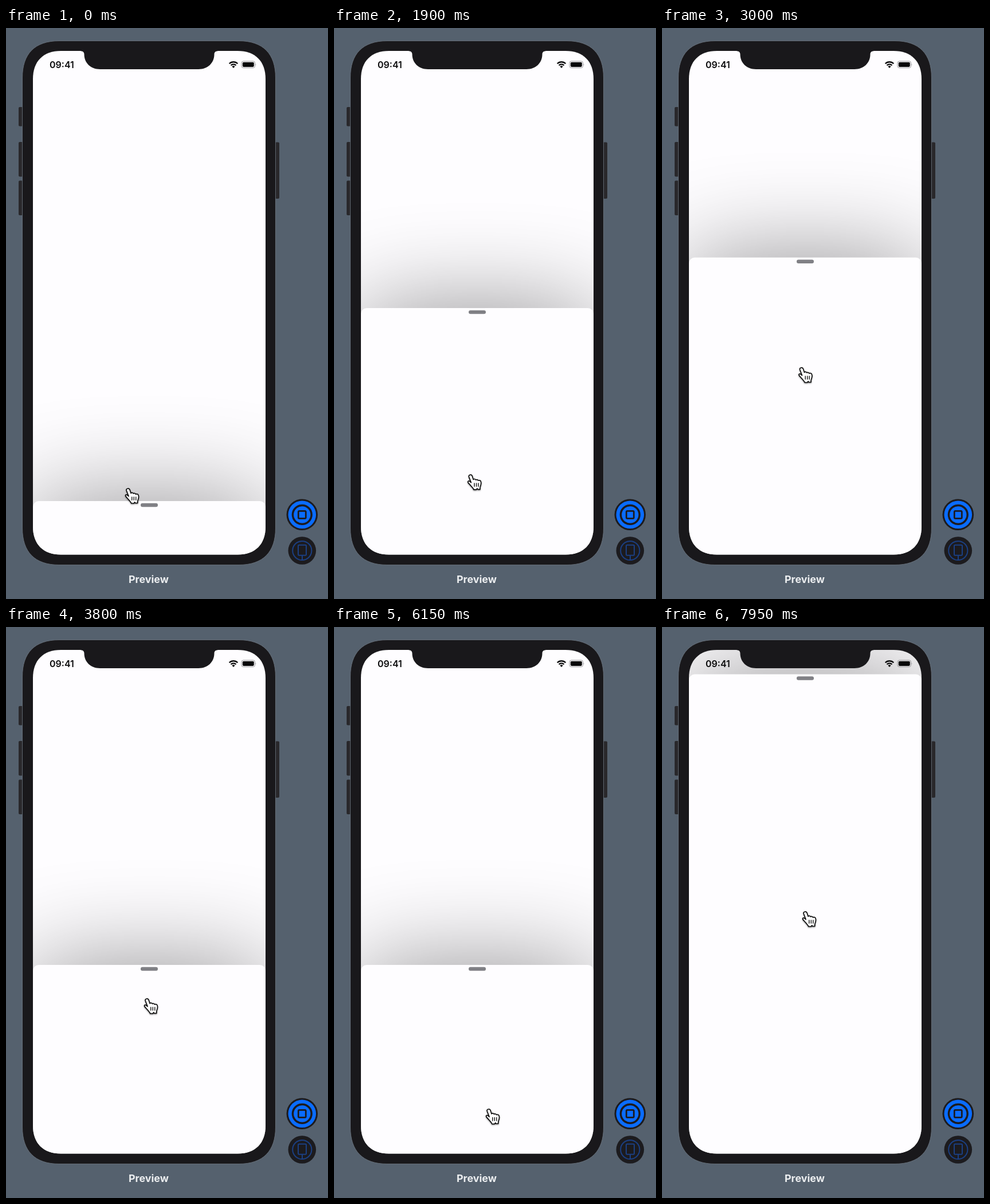
Animation of 562x997 px, one loop 8 s. Source, as an HTML page:

```html
<!DOCTYPE html>
<html lang="en">
<head>
<meta charset="utf-8">
<title>Slide-over card</title>
<style>
  html, body { margin: 0; width: 100%; height: 100%; overflow: hidden; background: #55616e; }
  svg { display: block; width: 100%; height: 100%; }
  text { font-family: Inter, "Open Sans", sans-serif; }
</style>
</head>
<body>
<svg viewBox="0 0 562 997">
  <defs>
    <clipPath id="screen">
      <path d="M47 89C47 58 65 40 96 40H404C435 40 453 58 453 89V870.500C453 901.500 435 919.500 404 919.500H96C65 919.500 47 901.500 47 870.500Z"/>
    </clipPath>
    <filter id="blur" filterUnits="userSpaceOnUse" x="-260" y="-300" width="1020" height="1800" color-interpolation-filters="sRGB">
      <feGaussianBlur stdDeviation="88"/>
    </filter>
    <filter id="drop" x="-30%" y="-30%" width="160%" height="170%">
      <feDropShadow dx="0" dy="1.200" stdDeviation="1" flood-color="#000" flood-opacity=".45"/>
    </filter>
  </defs>

  <rect width="562" height="997" fill="#55616e"/>

  <!-- phone -->
  <g fill="#29282b">
    <rect x="22" y="138" width="9" height="33.500" rx="2"/>
    <rect x="22" y="199" width="9" height="60.500" rx="2"/>
    <rect x="22" y="266.500" width="9" height="60.500" rx="2"/>
    <rect x="468" y="199.500" width="9" height="98.500" rx="2"/>
  </g>
  <path d="M28.500 87C28.500 45 50 22.500 93 22.500H406C449 22.500 470.500 45 470.500 87V873C470.500 915 449 937.500 406 937.500H93C50 937.500 28.500 915 28.500 873Z"
        fill="#19181b" stroke="#707983" stroke-width=".8"/>

  <!-- screen -->
  <g clip-path="url(#screen)">
    <rect x="47" y="40" width="406" height="880" fill="#fefdff"/>
    <g id="card">
      <rect x="47" width="406" height="1200" rx="10" fill="#000" opacity=".42" filter="url(#blur)"/>
      <rect x="47" width="406" height="1200" rx="10" fill="#fefdff"/>
      <rect x="235" y="3.800" width="30" height="6.400" rx="3.200" fill="#808085"/>
    </g>
  </g>

  <!-- notch and status bar -->
  <path d="M128 39V40C134 40 136.500 42 136.500 46C136.500 61 148 72 164 72H336C352 72 363.500 61 363.500 46C363.500 42 366 40 372 40V39Z" fill="#19181b"/>
  <text x="76" y="69.700" font-size="16" font-weight="600" fill="#0b0b0c">09:41</text>
  <g fill="none" stroke="#0b0b0c" stroke-width="2.300">
    <path d="M389.700 62.300A10.300 10.300 0 0 1 404.300 62.300"/>
    <path d="M392.500 65.200A6.300 6.300 0 0 1 401.500 65.200"/>
  </g>
  <path d="M397 70L394.400 67.200A3.700 3.700 0 0 1 399.600 67.200Z" fill="#0b0b0c"/>
  <rect x="411" y="58" width="23.600" height="11.600" rx="3.300" fill="none" stroke="#99989b"/>
  <rect x="412.800" y="59.700" width="20" height="8.200" rx="1.800" fill="#080809"/>
  <path d="M435.700 62.200Q437.400 63.800 435.700 65.600Z" fill="#99989b"/>

  <text x="249" y="968.800" font-size="17.900" font-weight="700" fill="#eceef0" text-anchor="middle">Preview</text>

  <!-- preview controls -->
  <circle cx="516.800" cy="849.800" r="27.300" fill="#1c1b1e"/>
  <circle cx="516.800" cy="849.800" r="24.300" fill="#0a6cff"/>
  <g fill="none" stroke="#1c1b1e">
    <circle cx="516.800" cy="849.800" r="16.400" stroke-width="3.500"/>
    <rect x="510.300" y="843.300" width="13" height="13" rx="1.500" stroke-width="2.800"/>
  </g>
  <circle cx="516.800" cy="912.500" r="24.300" fill="#1c1b1e"/>
  <g fill="none" stroke="#1b3f82" stroke-width="2">
    <circle cx="516.800" cy="912.500" r="16.600"/>
    <rect x="510" y="902.800" width="14" height="18" rx="1.500"/>
    <path d="M517 921V929"/>
  </g>

  <!-- pointer -->
  <g id="hand" filter="url(#drop)">
    <g transform="scale(1.040)" stroke="#0a0a0a" stroke-linecap="round" stroke-linejoin="round">
      <path fill="#fff" stroke-width="1.600" d="M5 1.200C6.800.6 8.200 1.600 8.800 3.400L10.600 9C11.400 7.600 14 7.800 14.800 9.600C16 8.600 18 9 18.800 10.600C20.200 9.800 22.400 10.400 23 12C24 14.500 23.600 17 22.600 19.500C22 21 21.600 22 21.800 25.500L18 25.500L17 24L15.600 26L11.400 26C10.500 23.500 8.500 22 7 20C5 17.500 3.200 16 1.800 14C.8 12 2.400 10.800 4.200 11.800L6.800 14L3.200 4.600C2.600 2.800 3.400 1.600 5 1.200Z"/>
      <path fill="none" stroke-width="1.300" d="M12.300 15.200V20.500M15.700 15.200V20.500M19 15.200V20.500"/>
    </g>
  </g>
</svg>
<script>
  const LOOP = 8000, STEP = 50;
  const TOP = 83, MIDDLE = 590, BOTTOM = 826;
  const STIFFNESS = 0.025; // settling rate per ms

  // Turning points of the hand: [time, position]
  const sway = [[0, 207], [1100, 222], [2250, 235], [3800, 240], [5050, 259], [6150, 264], [7950, 244]];
  const lift = [
    [0, 803], [300, 842], [650, 795], [800, 795], [1420, 606], [1680, 880], [2460, 331],
    [3000, 592], [3500, 648], [3800, 648], [3950, 625], [4350, 835], [4750, 835],
    [5285, 599], [5450, 599], [5600, 563], [6455, 950], [7010, 944], [7700, 403], [7950, 496]
  ];
  // The card follows the hand from grab to release, then settles at a stop.
  const drags = [
    { grab: 300, release: 1420, stop: MIDDLE },
    { grab: 1680, release: 2950, stop: MIDDLE },
    { grab: 3800, release: 4350, stop: BOTTOM },
    { grab: 4750, release: 5600, stop: MIDDLE },
    { grab: 7010, release: 7700, stop: TOP }
  ];

  const ease = u => (1 - Math.cos(Math.PI * u)) / 2;

  function along(points, t) {
    const i = points.findIndex(p => p[0] > t);
    if (i < 0) return points[points.length - 1][1];
    const [t0, a] = points[i - 1], [t1, b] = points[i];
    return a + (b - a) * ease((t - t0) / (t1 - t0));
  }

  function cardY(t) {
    let y = BOTTOM, rest = BOTTOM;
    for (const { grab, release, stop } of drags) {
      if (t < grab) break;
      y = rest + along(lift, Math.min(t, release)) - along(lift, grab);
      if (t > release) {
        const s = (t - release) * STIFFNESS;
        y = stop + (y - stop) * (1 + s) * Math.exp(-s);
      }
      rest = stop;
    }
    return y;
  }

  const card = document.getElementById("card");
  const hand = document.getElementById("hand");
  const move = (el, x, y) => el.setAttribute("transform", `translate(${x.toFixed(1)} ${y.toFixed(1)})`);

  function draw(t) {
    move(card, 0, cardY(t));
    move(hand, along(sway, t), along(lift, t));
  }

  let start;
  function tick(now) {
    start ??= now;
    draw(Math.floor((now - start) % LOOP / STEP) * STEP);
    requestAnimationFrame(tick);
  }
  draw(0);
  requestAnimationFrame(tick);
</script>
</body>
</html>
```
